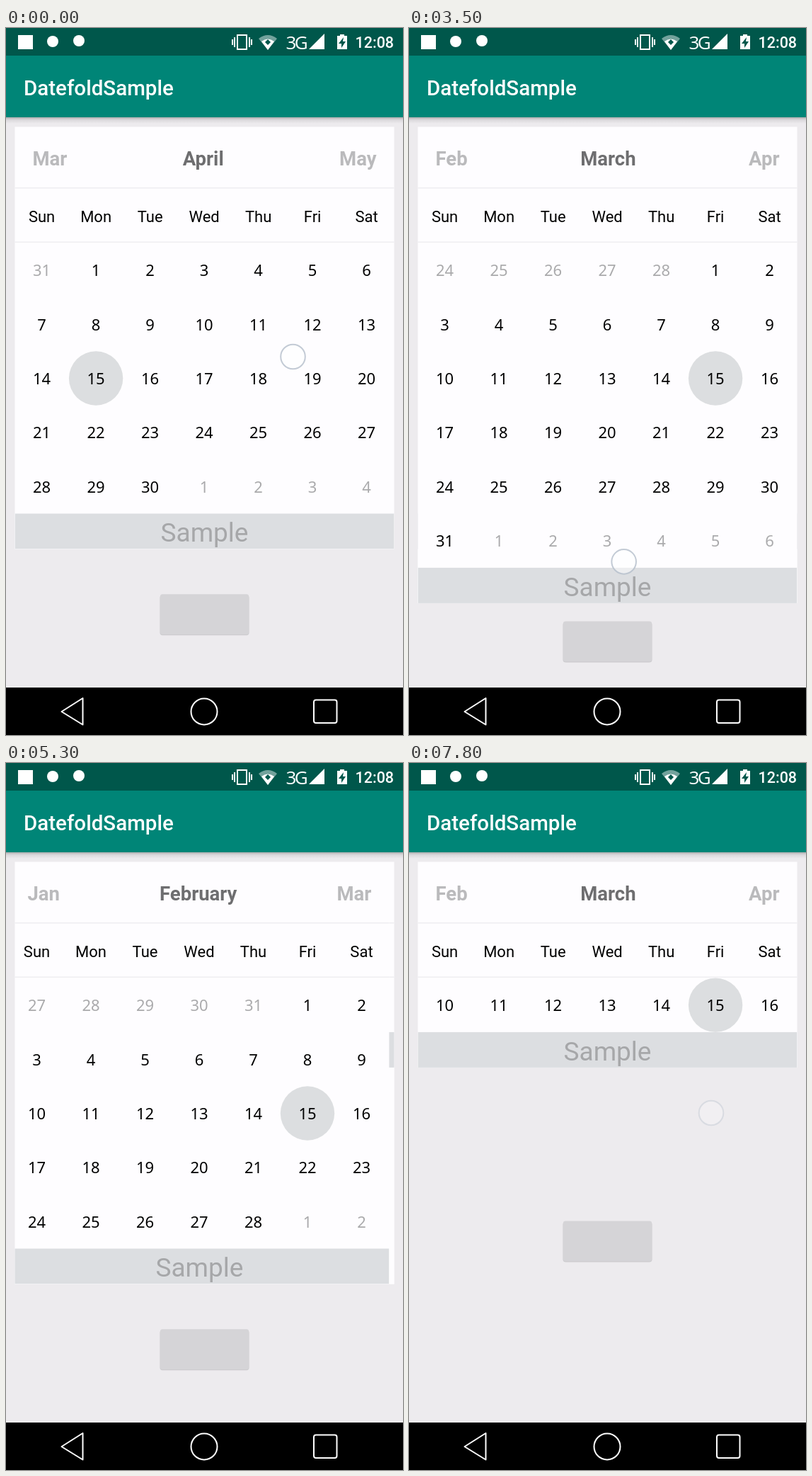
Animation of 561x998 px, one loop 8 s. Source, as an HTML page:

```html
<!DOCTYPE html>
<html lang="en">
<head>
<meta charset="utf-8">
<title>Calendar</title>
<style>
  html, body { margin: 0; width: 100%; height: 100%; overflow: hidden; background: #edebee; }
  svg { display: block; width: 561px; height: 998px; font-family: Roboto, sans-serif; }
  .title { font-size: 29.5px; font-weight: 500; fill: #fff; }
  .clock { font-size: 21.5px; font-weight: 500; fill: #fff; }
  .net { font: 26px "Open Sans", sans-serif; letter-spacing: -2.5px; fill: #fff; }
  .month { font-size: 27.5px; font-weight: 700; fill: #6e6e70; }
  .near { fill: #bababc; }
  .weekday, .day { font-size: 22px; text-anchor: middle; }
  .day { font-family: "Noto Sans", sans-serif; }
  .other { fill: #aaaaac; }
  .sample { font-size: 37px; text-anchor: middle; fill: #a6a7a9; }
  .nav { fill: none; stroke: #fff; stroke-width: 2; stroke-linejoin: round; }
</style>
</head>
<body>
<svg viewBox="0 0 561 998">
  <defs>
    <clipPath id="panelClip"><rect id="panelShape" x="12.5" y="139.5" width="536"/></clipPath>
    <linearGradient id="shade" x2="0" y2="1">
      <stop stop-color="#000" stop-opacity=".26"/>
      <stop offset=".4" stop-color="#000" stop-opacity=".08"/>
      <stop offset="1" stop-color="#000" stop-opacity="0"/>
    </linearGradient>
  </defs>
  <rect width="561" height="998" fill="#edebee"/>

  <rect y="126" width="561" height="9" fill="url(#shade)"/>
  <rect y="39" width="561" height="87" fill="#008577"/>
  <text class="title" x="25" y="95">DatefoldSample</text>

  <rect width="561" height="39" fill="#00574b"/>
  <g fill="#fff">
    <rect x="17" y="10" width="21" height="20"/>
    <circle cx="66" cy="19" r="8"/>
    <circle cx="103" cy="18" r="8"/>
    <path d="M357 15Q370 5 383 15L370 31Z" opacity=".45"/>
    <path d="M361 19Q370 12 379 19L370 31Z"/>
    <path d="M366 20L370 16L374 20L370 24Z" fill="#00574b"/>
    <path d="M428 30L450 8V30Z"/>
    <path d="M472 9H478V11H482V30H468V11H472Z"/>
    <path d="M477 13L470 22H474V28L480 19H476Z" fill="#00574b"/>
  </g>
  <path d="M327 10H340V30H327ZM323 13V27M344 13V27M320 16V24M347 16V24" fill="none" stroke="#fff" stroke-width="2"/>
  <text class="net" x="395.5" y="30">3G</text>
  <text class="clock" x="493.5" y="28">12:08</text>

  <g id="panel" clip-path="url(#panelClip)">
    <rect x="12" y="139" width="538" height="700" fill="#fefdff"/>
  </g>

  <g id="button">
    <rect x="217.5" y="-28" width="126" height="57" rx="4" fill="#c9c8cb"/>
    <rect x="218" y="-29" width="125" height="57" rx="3" fill="#d5d4d7"/>
  </g>

  <rect y="931" width="561" height="67"/>
  <g class="nav">
    <path d="M78.5 965L108.5 946V983.5Z"/>
    <circle cx="280" cy="965" r="18.5"/>
    <rect x="435" y="948.5" width="32.5" height="32.5" rx="3"/>
  </g>
  <circle id="touch" r="17.3" fill="#fff" fill-opacity=".5" stroke="#b4becb" stroke-opacity=".8" stroke-width="2"/>
</svg>

<script>
const LOOP = 8000, STEP = 100, LAST_CHANGE = 7800;
const PAGE = 536, LEFT = 12.5, PANEL_TOP = 139.5, GRID_TOP = 303.5;
const COLUMN = 76.5, ROW = 76.4, BAR = 50, CHOSEN_ROW = 2;
const NAMES = ['January', 'February', 'March', 'April', 'May', 'June'];
const WEEKDAYS = ['Sun', 'Mon', 'Tue', 'Wed', 'Thu', 'Fri', 'Sat'];
const byId = id => document.getElementById(id);
const clamp01 = v => Math.min(1, Math.max(0, v));
const mix = (a, b, k) => a + (b - a) * k;

function add(parent, tag, attrs = {}, text = '') {
  const node = document.createElementNS('http://www.w3.org/2000/svg', tag);
  for (const key in attrs) node.setAttribute(key, attrs[key]);
  node.textContent = text;
  parent.append(node);
  return node;
}

function buildHeader(root, month) {
  const label = (x, anchor, text, cls) =>
    add(root, 'text', { x, y: 194, class: cls, 'text-anchor': anchor }, text);
  const left = 37.5, right = 523.5;
  const before = label(left, 'start', NAMES[month - 1].slice(0, 3), 'month near');
  const after = label(right, 'end', NAMES[month + 1].slice(0, 3), 'month near');
  const gapStart = left + before.getComputedTextLength();
  const gapEnd = right - after.getComputedTextLength();
  label((gapStart + gapEnd) / 2, 'middle', NAMES[month], 'month');
  for (const y of [225, 301.5])
    add(root, 'rect', { x: LEFT, y, width: PAGE, height: 1.5, fill: '#efeef1' });
}

function buildPage(month) {
  const root = add(byId('panel'), 'g');
  buildHeader(root, month);
  const columnX = c => 50.6 + c * COLUMN;
  WEEKDAYS.forEach((name, c) => add(root, 'text', { x: columnX(c), y: 274, class: 'weekday' }, name));

  const lead = new Date(2019, month, 1).getDay();
  const length = new Date(2019, month + 1, 0).getDate();
  const rows = [];
  for (let r = 0; r * 7 < lead + length; r++) {
    const row = add(root, 'g');
    for (let c = 0; c < 7; c++) {
      const date = r * 7 + c - lead + 1;
      const x = columnX(c), y = GRID_TOP + (r + .5) * ROW;
      const outside = date < 1 || date > length;
      if (date === 15) add(row, 'circle', { cx: x, cy: y, r: 38.2, fill: '#dcdee0' });
      add(row, 'text', { x, y: y + 8.4, class: outside ? 'day other' : 'day' },
        new Date(2019, month, date).getDate());
    }
    rows.push(row);
  }

  const bar = add(root, 'g');
  add(bar, 'rect', { x: LEFT, width: PAGE, height: 600, fill: '#fefdff' });
  add(bar, 'rect', { x: LEFT, width: PAGE, height: BAR, fill: '#dcdee1' });
  add(bar, 'text', { x: 280.5, y: 39.8, class: 'sample' }, 'Sample');
  return { root, rows, bar, bottom: 0 };
}

const pages = [1, 2, 3, 4].map(buildPage);
const [feb, mar] = pages;
const FIRST_PAGE = 2;

const swipes = [
  { start: 900, end: 1500, step: 1, y: 490 },
  { start: 1800, end: 2400, step: -1, y: 490 },
  { start: 2400, end: 3185, step: -1, y: 523 },
  { start: 4800, end: 5400, step: -1, y: 495 },
  { start: 6800, end: 7500, step: 1, y: 435 }
];
mar.folding = { start: 3560, end: 4440 };
feb.folding = { start: 5800, end: 6425 };

const touch = (start, end, x0, y0, x1, y1) => ({ start, end, x0, y0, x1, y1 });
const touches = [
  touch(0, 200, 405.5, 464, 292, 494),
  ...swipes.map(({ start, step, y }) =>
    touch(start, start + 300, 306 + step * 156, y, 306 - step * 156, y)),
  ...[3400, 5800].map(start => touch(start, start + 300, 300, 870, 311, 520)),
  touch(7600, 7800, 414, 438, 427, 494)
];

// Quick drag that settles softly.
function progress({ start, end }, t) {
  const k = 1 - (1 - clamp01((t - start) / (end - start))) ** 1.5;
  return k * k * (3 - 2 * k);
}

// Rows below the chosen week are covered first, then the rows above it stack and fade.
function fold(page, k) {
  const count = page.rows.length;
  const amount = k * (count - 1) * ROW;
  const rise = Math.max(0, amount - (count - 1 - CHOSEN_ROW) * ROW);
  const barTop = GRID_TOP + count * ROW - amount;
  page.rows.forEach((row, r) => {
    row.setAttribute('transform', `translate(0 ${-Math.min(rise, r * ROW)})`);
    const fade = r === 0 ? (rise - 40) / 85 : r < CHOSEN_ROW ? rise / 140 : 0;
    row.setAttribute('opacity', 1 - clamp01(fade));
  });
  page.bar.setAttribute('transform', `translate(0 ${barTop})`);
  page.bottom = barTop + BAR;
}

function drawTouch(t) {
  const dot = byId('touch');
  const active = touches.find(({ start, end }) => t >= start && t <= end);
  if (!active) return dot.setAttribute('opacity', 0);
  const { start, end, x0, y0, x1, y1 } = active;
  const k = (t - start) / (end - start);
  dot.setAttribute('cx', mix(x0, x1, k));
  dot.setAttribute('cy', mix(y0, y1, k));
  dot.setAttribute('opacity', k < 1 ? 1 : .45);
}

function draw(t) {
  const scroll = swipes.reduce((sum, swipe) => sum + swipe.step * progress(swipe, t), FIRST_PAGE);
  pages.forEach((page, i) => {
    page.root.setAttribute('transform', `translate(${(i - scroll) * PAGE} 0)`);
    fold(page, page.folding ? progress(page.folding, t) : 0);
  });
  const { bottom } = pages[Math.round(scroll)];
  byId('panelShape').setAttribute('height', bottom - PANEL_TOP);
  byId('button').setAttribute('transform', `translate(0 ${(bottom + 921) / 2})`);
  drawTouch(t);
}

function tick() {
  const t = performance.now() % LOOP;
  draw(Math.min(LAST_CHANGE, Math.floor(t / STEP) * STEP));
  requestAnimationFrame(tick);
}
tick();
</script>
</body>
</html>
```
